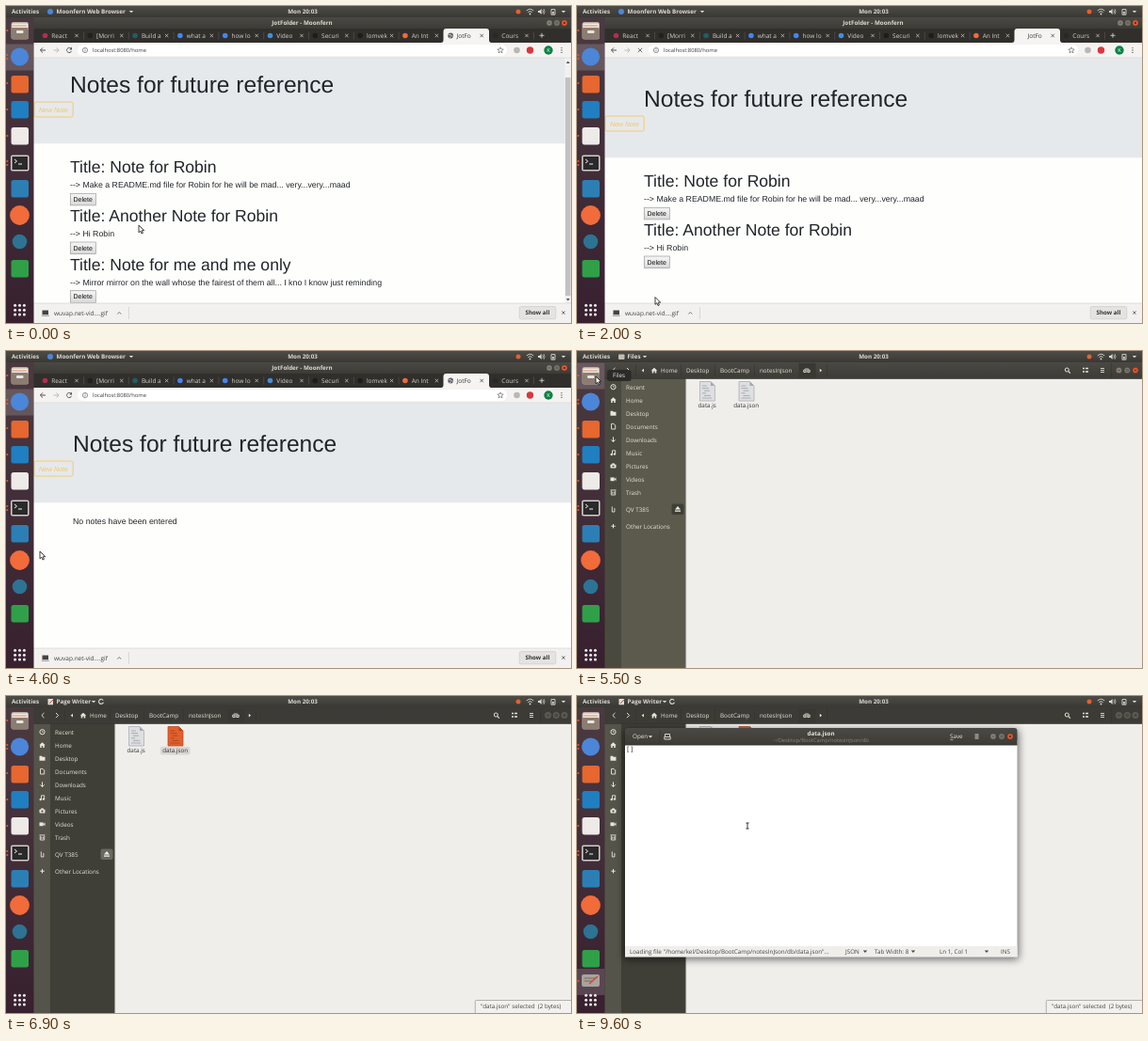
These frames come from a looping animation (600 px wide and 337 px high, 9.9 s). An HTML page:

```html
<!DOCTYPE html>
<html lang="en">
<head>
<meta charset="utf-8">
<title>Deleting notes</title>
<style>
html, body { margin: 0; width: 100%; height: 100%; overflow: hidden; background: #fff; }
svg { display: block; width: 100vw; height: 100vh; }
text { font: 500 6.3px "Open Sans", "Noto Sans", sans-serif; text-rendering: geometricPrecision; white-space: pre; }
.bold { font-weight: 700; font-size: 6.25px; }
.page { font: 8.78px "Liberation Sans", Arial, sans-serif; }
.h1 { font-size: 24.6px; }
.h2 { font-size: 17.57px; }
.button { font-size: 7.03px; }
.slanted { font-style: italic; }
.tab { font-size: 6.5px; }
.small { font-size: 5.8px; }
.mono { font: 7px "DejaVu Sans Mono", monospace; }
.mid { text-anchor: middle; }
</style>
</head>
<body>
<svg id="stage" viewBox="0 0 600 337">
  <defs>
    <linearGradient id="dock" x2="0" y2="1"><stop stop-color="#4b3a40"/><stop offset="1" stop-color="#38202f"/></linearGradient>
    <linearGradient id="panel" x2="0" y2="1"><stop stop-color="#4d4c46"/><stop offset="1" stop-color="#393834"/></linearGradient>
    <linearGradient id="bar" x2="0" y2="1"><stop stop-color="#4a4943"/><stop offset="1" stop-color="#3c3b36"/></linearGradient>
    <linearGradient id="key" x2="0" y2="1"><stop stop-color="#f6f6f6"/><stop offset="1" stop-color="#d9d9d9"/></linearGradient>
    <filter id="shadow" x="-10%" y="-10%" width="120%" height="125%"><feGaussianBlur stdDeviation="4"/></filter>
  </defs>
</svg>
<script>
const LOOP = 9900, RELOAD = 1900, FILES = 5300, BLUR = 6900, EDITOR = 7300;
const DELETED = [4300, 3100, RELOAD];
const INK = '#e6e3da';

const rect = (x, y, w, h, fill, more = '') =>
  `<rect x="${x}" y="${y}" width="${w}" height="${h}" fill="${fill}" ${more}/>`;
const dot = (x, y, r, fill, more = '') => `<circle cx="${x}" cy="${y}" r="${r}" fill="${fill}" ${more}/>`;
const shape = (d, fill) => `<path d="${d}" fill="${fill}"/>`;
const line = (d, color, width = 1) => `<path d="${d}" fill="none" stroke="${color}" stroke-width="${width}"/>`;
const text = (x, baseline, s, fill, cls = '') =>
  `<text x="${x}" y="${baseline}" fill="${fill}" class="${cls}">${s.replace(/>/g, '&gt;')}</text>`;
const label = (x, y, s, fill, cls) => text(x, y + 2.4, s, fill, cls);
const move = (x, y, content) => `<g transform="translate(${x} ${y})">${content}</g>`;
const during = (from, to, content) => `<g class="timed" data-from="${from}" data-to="${to}">${content}</g>`;
const list = (items, draw) => items.map(draw).join('');
const caret = (x, y, fill) => shape(`M${x - 2.2} ${y - 1.1}h4.4l-2.2 2.4z`, fill);
const cross = (x, y, color, r = 1.7) =>
  line(`M${x - r} ${y - r}l${2 * r} ${2 * r}m0 ${-2 * r}l${-2 * r} ${2 * r}`, color, .8);
const burger = (x, y, color) => line(`M${x - 2} ${y - 2}h4m-4 2h4m-4 2h4`, color, .9);
const windowButtons = (y, xs, active) => list(xs, (x, i) =>
  dot(x, y, 3.2, !active ? '#57564f' : i == 2 ? '#e9582f' : '#84827a',
    `stroke="${active ? '#35342f' : '#6b6a62'}" stroke-width=".5"`) +
  (i == 0 ? line(`M${x - 1.2} ${y}h2.4`, '#33322d', .6)
    : i == 1 ? line(`M${x - 1.1} ${y - 1.1}h2.2v2.2h-2.2z`, '#33322d', .5) : cross(x, y, '#46261b', 1)));

// Web page
function note(i, title, body) {
  return during(0, DELETED[i], move(71, 51.7 * i,
    text(0, 192.2, 'Title: ' + title, '#212529', 'page h2') +
    text(0, 208.2, '--> ' + body, '#212529', 'page') +
    rect(.3, 214.3, 27, 12.6, 'url(#key)', 'stroke="#9b9b9b" stroke-width=".7"') +
    text(3.5, 223.1, 'Delete', '#111', 'page button')));
}

function page(dx, dy) {
  return move(0, dy,
    rect(29, 40, 571, 121.3, '#e6e9eb') +
    rect(30, 117, 41.2, 16, 'none', 'rx="1.8" stroke="#f3c763" stroke-width=".9"') +
    text(35, 127.6, 'New Note', '#f1c662', 'page button slanted') +
    move(dx, 0,
      text(71, 107, 'Notes for future reference', '#212529', 'page h1') +
      note(0, 'Note for Robin', 'Make a README.md file for Robin for he will be mad... very...very...maad') +
      note(1, 'Another Note for Robin', 'Hi Robin') +
      note(2, 'Note for me and me only', 'Mirror mirror on the wall whose the fairest of them all... I kno I know just reminding') +
      during(DELETED[0], FILES, text(71, 184, 'No notes have been entered', '#212529', 'page'))));
}

const scrollbar = rect(593.5, 55, 6.5, 261, '#f1f1f0') + rect(594, 76, 5.5, 232, '#c3c2c0') +
  shape('M594.8 61h4l-2-2.4z', '#555') + shape('M594.8 311h4l-2 2.4z', '#555');

// Browser frame
const whileIdle = content =>
  list([[0, RELOAD], [2200, 3100], [3300, 4300], [4500, FILES]], ([from, to]) => during(from, to, content));

const tabs = [['React', '#b52a55'], ['[Morri', '#22211f'], ['Build a', '#1f5f63'], ['what a', '#4285f4'],
  ['how lo', '#4285f4'], ['Video', '#3f8fe0'], ['Securi', '#1e1d1b'], ['lomvek', '#1e1d1b'],
  ['An Int', '#ef6a3a'], ['JotFo', '#5f6368'], ['Cours', '#292825']];

function tab([name, color], i) {
  const active = i == 9, x = 47.8 * i;
  const icon = active
    ? dot(42 + x, 31.5, 2.9, color) + line(`M${40 + x} 30.5h2l1 1.5h1.6m-3.6 2l1-1.5`, '#eee', .7)
    : dot(41.5 + x, 31.5, 2.8, color);
  return (active ? shape('M462 39q2.5 0 2.5-3v-9q0-3 3-3h42.5q3 0 3 3v9q0 3 2.5 3z', '#f5f4f2')
      : i == 8 ? '' : line(`M${82.5 + x} 27.5v8`, '#5b5a54', .6)) +
    (active ? whileIdle(icon) : icon) +
    label(48.3 + x, 31.3, name, active ? '#333' : '#d4d2cc', 'tab') +
    cross(75 + x, 31.5, active ? '#444' : '#c8c6c0');
}

const reloadIcon = line('M69.2 45.4a2.6 2.6 0 1 0 .4 2.4', '#555', .9) + shape('M70 43.6v2.8h-2.8z', '#555');
const browser =
  rect(29, 12, 571, 304, '#fefefd') +
  during(0, RELOAD, page(-3, -15) + scrollbar) + during(RELOAD, FILES, page(0, 0)) +
  rect(29, 12, 571, 12, 'url(#bar)') +
  label(314.5, 17.6, 'JotFolder - Moonfern', '#dfdbd2', 'bold mid') +
  windowButtons(18, [577, 585, 593], true) +
  rect(29, 24, 571, 15, '#302f2b') + list(tabs, tab) +
  line('M566.5 31.3h5m-2.5-2.5v5', '#d4d2cc', .9) +
  rect(29, 39, 571, 16, '#f4f3f1') + line('M29 55h571', '#d4d2cf', .6) +
  rect(76, 41, 456, 12, '#fff', 'rx="6"') +
  line('M42 47h-5.5m2.5-2.6l-2.6 2.6l2.6 2.6', '#444', .9) + line('M50.5 47h5.5m-2.5-2.6l2.6 2.6l-2.6 2.6', '#b5b4b2', .9) +
  whileIdle(reloadIcon) +
  list(DELETED, t => during(t, t == RELOAD ? 2200 : t + 200, cross(67, 47, '#555', 2.2))) +
  dot(84, 47, 2.6, 'none', 'stroke="#666" stroke-width=".7"') + line('M84 46.4v2m0-3.4v.7', '#666', .7) +
  label(92, 46.8, 'localhost:8080/home', '#3c3c3c', 'small') +
  line('M525 43.8l.9 2.1l2.3.2l-1.8 1.5l.6 2.3l-2-1.3l-2 1.3l.6-2.3l-1.8-1.5l2.3-.2z', '#555', .6) +
  dot(542.5, 47, 3.3, '#b9b8b6') + dot(556.5, 47, 3.7, '#d7373f') +
  dot(576, 47, 4.7, '#0b8043') + label(576, 46.7, 'K', '#fff', 'small mid') +
  list([44.6, 47, 49.4], y => dot(590, y, .7, '#555')) +
  rect(29, 316, 571, 21, '#f2f1ef') + line('M29 316h571', '#d3d1ce', .7) +
  rect(38.5, 323.5, 6.5, 4.6, '#444') + line('M37.8 329.2h8', '#777', .8) +
  label(51, 326.5, 'wuvap.net-vid....gif', '#444', 'tab') + line('M118.3 327.5l2-2l2 2', '#555', .8) +
  line('M130.5 320v13', '#cfcdca', .7) +
  rect(545.3, 319.5, 38.5, 13.3, '#e4e3e1', 'rx="1.5" stroke="#c9c7c4" stroke-width=".6"') +
  label(564.5, 325.8, 'Show all', '#333', 'bold mid') + cross(592, 326, '#555');

// File manager
const places = [
  ['Recent', 38, c => dot(0, 0, 2.6, 'none', `stroke="${c}"`) + line('M0-1.5v1.7h1.2', c, .7)],
  ['Home', 52, c => shape('M-3.2 0L0-3L3.2 0H2.3V2.8H.7V.8H-.7V2.8H-2.3V0z', c)],
  ['Desktop', 66, c => shape('M-3-2.5h2.5l.8 1H3v4h-6z', c)],
  ['Documents', 80, c => line('M-2-2.8h2.6l1.6 1.6v4h-4.2z', c, .9)],
  ['Downloads', 94, c => line('M0-2.8v5.2m-2.2-2.2l2.2 2.2l2.2-2.2', c)],
  ['Music', 108, c => line('M-1 1.6v-4h3.2v3.5', c, .9) + dot(-1.8, 1.8, 1.2, c) + dot(1.4, 1.4, 1.2, c)],
  ['Pictures', 122, c => rect(-3, -1.8, 6, 4.2, c, 'rx=".8"') + rect(-1.3, -2.8, 2.6, 2, c) + dot(0, .3, 1.1, '#4b4a41')],
  ['Videos', 136, c => rect(-3, -1.8, 4.2, 3.8, c) + shape('M1 0l2-1.8v3.8z', c)],
  ['Trash', 150, c => line('M-2.2-1.6v4.4h4.4v-4.4m-5.2-.7h6M-.8-.5v2m1.6 0v-2', c, .9)],
  ['QV T385', 168, c => line('M-1.2-2.8v5.6h2.6v-4', c, .9)],
  ['Other Locations', 186, c => line('M-2.2 0h4.4m-2.2-2.2v4.4', c)]];

function fileIcon(x, name, selected) {
  const [paper, ink] = selected ? ['#e0602f', '#b5451d'] : ['#dedfe0', '#a3a8b1'];
  return (selected ? rect(x - 16, 53.8, 31.5, 8.6, '#d9d7d3', 'rx="2"') : '') +
    `<path d="M${x - 8} 32.5h11.5l4.5 4.5v16h-16z" fill="${paper}" stroke="${ink}" stroke-width=".7"/>` +
    shape(`M${x + 3.5} 32.5l4.5 4.5h-4.5z`, ink) +
    line(`M${x - 5.5} 37h5m-5 2.6h7m-5 2.6h6m-8 2.6h4m-2 2.6h7m-9 2.6h10`, ink, .9) +
    label(x - .3, 57.7, name, '#333', 'mid');
}

function files(active) {
  return rect(29, 12, 571, 325, '#f0eeeb') +
    rect(29, 29, 18, 308, active ? '#4a493f' : '#55544a') +
    rect(47, 29, 68.5, 308, active ? '#5b5a4c' : '#3f3e37') + line('M115.7 29v308', '#8d8b82', .5) +
    list(places, ([name, y, icon]) => move(38.5, y + .2, icon('#e8e5dc')) + label(52, y + .1, name, INK)) +
    rect(100.5, 162.5, 13, 11.5, active ? '#403f36' : '#6a685d', 'rx="2"') +
    shape('M104 168.5l3-3.5l3 3.5zm0 1h6v1.2h-6z', '#eee') +
    rect(29, 12, 571, 17.5, active ? 'url(#bar)' : '#3c3b36') + line('M29 29.5h571', '#34332e', .6) +
    line('M40.5 18l-2.6 2.6l2.6 2.6M53 18l2.6 2.6l-2.6 2.6', INK) +
    shape('M71 18.8v3.8l-2.3-1.9z', INK) + move(82, 20.7, places[1][2](INK)) +
    line('M62.5 14v13M110.5 14v13M146.5 14v13M188.5 14v13M265.5 14v13', '#33322d', .5) +
    rect(235.5, 13, 18, 16, '#393833') +
    list([[89, 'Home'], [116, 'Desktop'], [152, 'BootCamp'], [194, 'notesInJson']], ([x, s]) => label(x, 20.5, s, INK)) +
    label(240, 20.5, 'db', '#f2efe6', 'bold') + shape('M257.8 18.8v3.8l2.3-1.9z', INK) +
    dot(520.3, 20, 2, 'none', `stroke="${INK}"`) + line('M521.8 21.6l2 2', INK, 1.2) +
    line('M537 18.5h2m1 0h3m-6 3.5h2m1 0h3', INK, 1.5) + burger(558, 20.5, INK) +
    line('M567.5 13v16', '#33322d', .5) + windowButtons(20.5, [575.5, 584.3, 593], active) + fileIcon(138.5, 'data.js');
}

const fileManager =
  during(FILES, BLUR, files(true)) + during(BLUR, LOOP, files(false)) +
  during(FILES, 6300, fileIcon(180, 'data.json')) +
  during(6300, LOOP, fileIcon(180, 'data.json', true) +
    rect(498.3, 323.5, 103, 15, '#f3f1ee', 'stroke="#98968f" stroke-width=".7" rx="1"') +
    label(504, 329.8, '"data.json" selected  (2 bytes)', '#444'));

// Editor window
const editor =
  rect(50, 36, 419, 244, '#000', 'opacity=".55" filter="url(#shadow)"') +
  rect(51, 47, 416.5, 230.3, '#fff') +
  shape('M51 52.3V37q0-3 3-3h410.5q3 0 3 3v15.3z', 'url(#bar)') + line('M51 52h416.5', '#2b2a26', .6) +
  label(59, 42.8, 'Open', INK) + caret(78, 43.3, INK) + line('M88 36v14', '#33322d', .5) +
  line('M93.5 43v-2.5h5v2.5M92.8 43.4h6.4v2.6h-6.4z', INK, .9) +
  label(259, 39.8, 'data.json', INK, 'bold mid') +
  label(259, 46.4, '~/Desktop/BootCamp/notesInJson/db', '#89877c', 'small mid') +
  label(396, 42.8, 'Save', INK) + burger(424.5, 43, INK) +
  windowButtons(43, [442, 451, 460], true) +
  during(8600, LOOP, line('M396.3 46.6h3.2', INK, .6)) +
  text(52, 59.3, '[]', '#333', 'mono') +
  rect(51, 266, 416.5, 11.3, '#efeeeb') +
  list([[56, 'Loading file "/home/kel/Desktop/BootCamp/notesInJson/db/data.json"...'], [285, 'JSON'],
    [316, 'Tab Width: 8'], [385, 'Ln 1, Col 1'], [450, 'INS']], ([x, s]) => label(x, 271.4, s, '#444')) +
  list([306, 357, 435], x => caret(x, 271.7, '#444'));

// Desktop shell
const appMenu = (icon, name, end) =>
  icon + label(53.5, 5.9, name, '#dfdbd2', 'bold') + caret(end, 6, '#dfdbd2');
const app = (y, fill) => rect(5.5, y - 9, 18.5, 18.5, fill, 'rx="2.5"');
const focus = y => rect(0, y - 14, 29.3, 28, '#fff', 'opacity=".16"');

const shell =
  rect(0, 12, 29.5, 325, 'url(#dock)') +
  during(0, FILES, focus(54.5)) + during(FILES, BLUR, focus(26.5)) +
  list([26, 52, 56, 82, 110, 138, 165, 169], y => dot(1.3, y, 1.1, '#e4572e')) +
  app(26, '#b9aea3') + rect(6.5, 18.5, 16.5, 5, '#efece6') + rect(5.5, 23, 18.5, 12, '#8b7d72', 'rx="2"') +
  rect(11, 26, 7.5, 3, '#e9e5df', 'rx="1"') + line('M7 21h15', '#e36a3b', .8) +
  dot(14.5, 54, 9.6, '#4c86d8') + app(83, '#e6672f') + app(110, '#1f7fc1') + app(138, '#edeae8') +
  rect(5, 158.5, 19.5, 17, '#d4d0cc', 'rx="2"') + rect(6.5, 160, 16.5, 14, '#2b2a2b') +
  line('M9 163l2.5 2l-2.5 2m4 1h4', '#eee') +
  app(194, '#2b7fb5') + dot(14.5, 222.5, 10.4, '#f26b3a') + dot(14.5, 250.5, 7.8, '#2d7393') + app(279, '#2fa048') +
  during(EDITOR, LOOP, focus(304) + rect(5, 296, 19, 13, '#aaa39e', 'rx="2"') +
    line('M7.5 300h13m-13 3h9', '#6b625e', .9) + line('M13 306l9-8', '#d2482c', 1.3) + dot(1.3, 303, 1.1, '#e4572e')) +
  list([...Array(9).keys()], i => dot(9.6 + i % 3 * 4.9, 318.3 + (i / 3 | 0) * 4.9, 1.5, '#f0eeee')) +
  rect(0, 0, 600, 12, 'url(#panel)') +
  label(6, 5.9, 'Activities', '#dfdbd2', 'bold') + label(315, 5.9, 'Mon 20:03', '#dfdbd2', 'bold mid') +
  during(0, FILES, appMenu(dot(47, 6, 3, '#4c86d8'), 'Moonfern Web Browser', 133)) +
  during(FILES, BLUR, appMenu(rect(44, 3.5, 6.5, 5.5, '#c6bcb2', 'rx="1"'), 'Files', 72)) +
  during(BLUR, LOOP, appMenu(rect(44.5, 3, 5.5, 6.3, '#e0ddd8') + line('M46 8l4.5-4.5', '#d2482c'), 'Page Writer', 93) +
    line('M103.2 4.6a2.5 2.5 0 1 0 .2 2.2', '#dfdbd2', 1.1)) +
  dot(544, 6, 2.5, '#e6602f') +
  line('M552.8 5q3.7-3.4 7.4 0m-5.8 1.6q2.1-2 4.2 0', '#dfdbd2', .9) + dot(556.5, 8.5, .9, '#dfdbd2') +
  shape('M565 5h1.6l2-2v6l-2-2h-1.6z', '#dfdbd2') + line('M569.8 4.3q1.4 1.7 0 3.4m1.2-4.6q2.2 2.9 0 5.8', '#dfdbd2', .7) +
  line('M579 3.6h4v5.6h-4z', '#dfdbd2', .9) + rect(580.2, 6, 1.6, 2.5, '#dfdbd2') + caret(592, 6, '#dfdbd2') +
  during(5400, 5800, rect(32, 20, 25.5, 12, '#2a2926', 'rx="2.5" opacity=".95"') + label(44.5, 25.8, 'Files', '#eee', 'mid'));

const pointer = `<g id="pointer">` +
  during(0, 6700, '<path d="M0 0v7.8l1.8-1.6l1.2 2.8l1.4-.6l-1.2-2.7h2.5z" fill="#fff" stroke="#111" stroke-width=".8"/>') +
  during(EDITOR, LOOP, line('M-1.6-3h3.2m-1.6 0v6m-1.6 0h3.2', '#222', .9)) + '</g>';

const stage = document.getElementById('stage');
stage.innerHTML += during(0, FILES, browser) + fileManager + during(EDITOR, LOOP, editor) + shell + pointer;

// Pointer stops: time, x, y
const path = [[0, 141, 233], [900, 141, 233], [1600, 83, 309.5], [2300, 83, 309.5], [2800, 84, 270], [3300, 84, 270],
  [3900, 84, 246], [4100, 84, 221], [4400, 84, 221], [4600, 36, 213], [5100, 20, 27], [5600, 20, 27], [5800, 48, 32],
  [6300, 180, 43], [7200, 181, 70], [7400, 182, 102], [8200, 181, 138], [LOOP, 181, 138]];
const smooth = k => k * k * (3 - 2 * k);

function pointerAt(t) {
  const i = path.findIndex(p => p[0] > t), [t0, x0, y0] = path[i - 1], [t1, x1, y1] = path[i];
  const k = smooth((t - t0) / (t1 - t0));
  return [x0 + (x1 - x0) * k, y0 + (y1 - y0) * k];
}

const timed = [...stage.querySelectorAll('.timed')];
const pointerGroup = document.getElementById('pointer');
const start = performance.now();

function render() {
  const t = Math.floor((performance.now() - start) % LOOP / 100) * 100;
  for (const g of timed) g.style.display = t >= g.dataset.from && t < g.dataset.to ? '' : 'none';
  pointerGroup.setAttribute('transform', `translate(${pointerAt(t)})`);
  requestAnimationFrame(render);
}
render();
</script>
</body>
</html>
```
